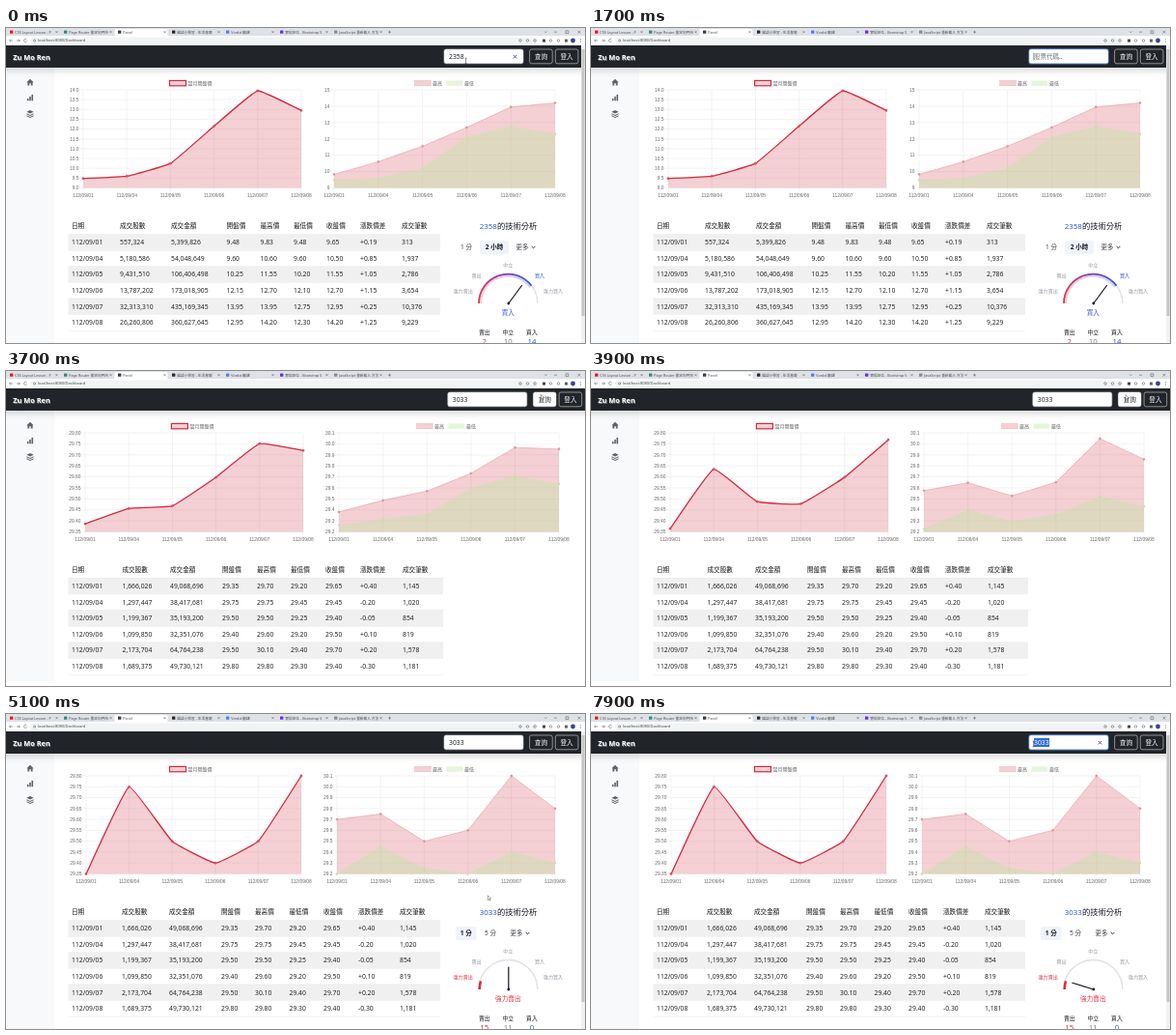
An HTML page that plays this animation: 600x326 px, repeating every 8000 ms.

```html
<!DOCTYPE html>
<html lang="zh-Hant">
<head>
<meta charset="utf-8">
<title>Stock dashboard</title>
<style>
html, body { margin: 0; width: 100%; height: 100%; overflow: hidden; background: #fff; }
svg { display: block; width: 600px; height: 326px; }
text { font-family: 'Noto Sans', 'Noto Sans CJK TC', 'Noto Sans CJK', sans-serif; white-space: pre; }
.axis text { font-family: 'Liberation Sans', 'Noto Sans CJK TC', 'Noto Sans CJK', sans-serif; fill: #666; }
</style>
</head>
<body>
<svg viewBox="0 0 600 326">
  <defs>
    <linearGradient id="mood" gradientUnits="userSpaceOnUse" x1="489" y1="0" x2="546" y2="0">
      <stop offset="0" stop-color="#e0364a"/>
      <stop offset=".45" stop-color="#8e3fae"/>
      <stop offset="1" stop-color="#2a5bd8"/>
    </linearGradient>
    <linearGradient id="shade" x1="0" y1="0" x2="0" y2="1">
      <stop offset="0" stop-opacity=".126"/>
      <stop offset=".33" stop-opacity=".075"/>
      <stop offset=".66" stop-opacity=".024"/>
      <stop offset="1" stop-opacity="0"/>
    </linearGradient>
  </defs>
  <g id="page"></g>
  <g id="charts" class="axis"></g>
  <g id="table"></g>
  <g id="widget"></g>
  <g id="nav"></g>
  <g id="browser"></g>
  <g id="pointer"></g>
</svg>
<script>
const LOOP = 8000, STEP = 100;
const RELOAD = 3700, SETTLE = 4100, CHART_START = 3660;

const lerp = (a, b, p) => a + (b - a) * p;
const clamp = v => Math.max(0, Math.min(1, v));
const at = (steps, t) => steps.filter(s => s[0] <= t).pop();
const polar = (cx, cy, r, deg) => {
  const a = deg * Math.PI / 180;
  return [cx + r * Math.cos(a), cy - r * Math.sin(a)];
};

// y is the vertical middle of the text
const text = (x, y, s, size, attrs = '') =>
  `<text x="${x}" y="${(y + size * 0.36).toFixed(2)}" font-size="${size}" ${attrs}>${s}</text>`;
const rect = (x, y, w, h, fill, attrs = '') =>
  `<rect x="${x}" y="${y}" width="${w}" height="${h}" fill="${fill}" ${attrs}/>`;
const path = (d, attrs) => `<path d="${d}" fill="none" ${attrs}/>`;
const dot = (x, y, r, fill, attrs = '') => `<circle cx="${x}" cy="${y}" r="${r}" fill="${fill}" ${attrs}/>`;
const MID = 'text-anchor="middle" ', END = 'text-anchor="end" ';

const shown = {};
function put(id, markup) {
  if (shown[id] === markup) return;
  shown[id] = markup;
  document.getElementById(id).innerHTML = markup;
}

// ---- data ----
const DAYS = ['01', '04', '05', '06', '07', '08'].map(d => '112/09/' + d);
const HEADS = ['日期', '成交股數', '成交金額', '開盤價', '最高價', '最低價', '收盤價', '漲跌價差', '成交筆數'];
const parse = s => s.split('\n').map((row, i) => [DAYS[i], ...row.split(' ')]);
const OLD = parse(`557,324 5,399,826 9.48 9.83 9.48 9.65 +0.19 313
5,180,586 54,048,649 9.60 10.60 9.60 10.50 +0.85 1,937
9,431,510 106,406,498 10.25 11.55 10.20 11.55 +1.05 2,786
13,787,202 173,018,905 12.15 12.70 12.10 12.70 +1.15 3,654
32,313,310 435,169,345 13.95 13.95 12.75 12.95 +0.25 10,376
26,260,806 360,627,645 12.95 14.20 12.30 14.20 +1.25 9,229`);
const NEW = parse(`1,666,026 49,068,696 29.35 29.70 29.20 29.65 +0.40 1,145
1,297,447 38,417,681 29.75 29.75 29.45 29.45 -0.20 1,020
1,199,367 35,193,200 29.50 29.50 29.25 29.40 -0.05 854
1,099,850 32,351,076 29.40 29.60 29.20 29.50 +0.10 819
2,173,704 64,764,238 29.50 30.10 29.40 29.70 +0.20 1,578
1,689,375 49,730,121 29.80 29.80 29.30 29.40 -0.30 1,181`);
const SCALES = {
  open: [{ min: 9, max: 14, step: .5, digits: 1 }, { min: 29.35, max: 29.8, step: .05, digits: 2 }],
  range: [{ min: 9, max: 15, step: 1, digits: 0 }, { min: 29.2, max: 30.1, step: .1, digits: 1 }]
};

// ---- layouts: first stock, reload without scrollbar, second stock ----
const LAYOUTS = [
  { rows: OLD, cols: [68, 118, 171, 228.5, 263.5, 298, 332, 367, 410], left: [80, 306], right: [340, 569], bottom: 165.5, edge: 450, head: 205, dx: 0 },
  { rows: NEW, cols: [68, 120.5, 170, 224, 260, 295, 331, 367, 411], left: [82, 308], right: [345, 573], bottom: 166.5, edge: 453, head: 205.5, dx: 3.8 },
  { rows: NEW, cols: [68, 120, 169, 223, 258, 293.5, 329, 365, 408], left: [83, 306], right: [343, 569], bottom: 165.5, edge: 450, head: 205, dx: 0 }
];
const layoutAt = t => LAYOUTS[t < RELOAD ? 0 : t < SETTLE ? 1 : 2];

// ---- charts ----
const TOP = 64;
const yOf = (v, s, bottom) => bottom - (v - s.min) / (s.max - s.min) * (bottom - TOP);

function grid([x0, x1], s, bottom) {
  let lines = '', out = '';
  const n = Math.round((s.max - s.min) / s.step);
  for (let i = 0; i <= n; i++) {
    const v = s.min + i * s.step, y = yOf(v, s, bottom);
    lines += `M${x0 - 3} ${y}H${x1}`;
    out += text(x0 - 4.5, y, v.toFixed(s.digits), 4.9, END);
  }
  DAYS.forEach((d, i) => {
    const x = lerp(x0, x1, i / 5);
    lines += `M${x} ${TOP}V${bottom + 3}`;
    out += text(x, bottom + 7.5, d, 4.9, MID);
  });
  return path(lines, 'stroke="#e6e6e6" stroke-width=".5"') + out;
}

function points(col, [x0, x1], scales, bottom, p) {
  return OLD.map((row, i) => [
    lerp(x0, x1, i / 5),
    lerp(yOf(+row[col], scales[0], bottom), yOf(+NEW[i][col], scales[1], bottom), p)
  ]);
}

function curve(pts, tension, bottom) {
  const cap = y => Math.max(TOP, Math.min(bottom, y));
  const handles = pts.map((c, i) => {
    const a = pts[i - 1] || c, b = pts[i + 1] || c;
    const da = Math.hypot(c[0] - a[0], c[1] - a[1]), db = Math.hypot(b[0] - c[0], b[1] - c[1]);
    const shift = k => [c[0] + k * (b[0] - a[0]), cap(c[1] + k * (b[1] - a[1]))];
    return [shift(-tension * da / (da + db)), shift(tension * db / (da + db))];
  });
  return pts.map((c, i) => i ? `C${handles[i - 1][1]} ${handles[i][0]} ${c}` : 'M' + c).join('');
}

function series(pts, bottom, { tension = 0, fill, line, width, mark }) {
  const d = curve(pts, tension, bottom);
  return `<path d="${d}L${pts[5][0]} ${bottom}L${pts[0][0]} ${bottom}Z" fill="${fill}"/>` +
    path(d, `stroke="${line}" stroke-width="${width}" stroke-linejoin="round"`) +
    pts.map(([x, y]) => dot(x, y, 1.15, mark, `stroke="${line}" stroke-width=".4"`)).join('');
}

const PINK = 'rgba(210,60,75,.24)', GREEN = 'rgba(187,229,158,.38)';
function charts(t) {
  const L = layoutAt(t), b = L.bottom, k = t < RELOAD ? 0 : 1, dx = L.dx / 2;
  const p = 1 - (1 - clamp((t - CHART_START) / 1000)) ** 4;
  const pts = (col, span, kind) => points(col, span, SCALES[kind], b, k ? p : 0);
  return grid(L.left, SCALES.open[k], b) + grid(L.right, SCALES.range[k], b) +
    series(pts(3, L.left, 'open'), b, { tension: .1, fill: PINK, line: '#d4283d', width: 1.3, mark: '#cf6674' }) +
    series(pts(4, L.right, 'range'), b, { fill: PINK, line: '#e6a3aa', width: .7, mark: '#dc8f98' }) +
    series(pts(5, L.right, 'range'), b, { fill: GREEN, line: 'rgba(205,225,170,.6)', width: .6, mark: '#d3d9ae' }) +
    rect(169.5 + dx, 54.4, 17, 5.4, PINK, 'stroke="#d4283d" stroke-width="1.2"') +
    text(188.5 + dx, 57, '當月開盤價', 5) +
    rect(423.7 + dx, 54.4, 16.5, 5.4, PINK, 'stroke="#e6b3b8" stroke-width=".5"') +
    text(442 + dx, 57, '最高', 5) +
    rect(456.5 + dx, 54.4, 16.5, 5.4, GREEN) + text(475 + dx, 57, '最低', 5);
}

// ---- table ----
function table(t) {
  const L = layoutAt(t), w = L.edge - 64.5, rowH = L.dx ? 16.65 : 16.55;
  const top = L.head + 8.6;
  let out = HEADS.map((h, i) => text(L.cols[i], L.head, h, 6.6, 'font-weight="500" fill="#111418"')).join('');
  L.rows.forEach((row, r) => {
    const y = top + r * rowH;
    out += rect(64.5, y, w, rowH, r % 2 ? '#fff' : '#f0f0f0') + rect(64.5, y, w, .4, '#dee2e6');
    row.forEach((cell, i) => out += text(L.cols[i], y + rowH / 2, cell, 6.8, 'fill="#212529"'));
  });
  return out + rect(64.5, top + 6 * rowH, w, .4, '#dee2e6');
}

// ---- analysis widget ----
const RED = '#dc3040', BLUE = '#2a5bd8', GREY = '#9598a1', INK = '#131722';
const VIEWS = [
  { code: '2358', tabs: [[477, '1 分'], [506, '2 小時'], [535, '更多']], on: 1, pill: [491, 30], mood: 3, color: BLUE, counts: [2, 10, 14] },
  { code: '3033', tabs: [[476.7, '1 分'], [502, '5 分'], [529, '更多']], on: 0, pill: [466, 21.5], mood: 0, color: RED, counts: [15, 11, 0] }
];
const MOODS = [['強力賣出', 473.7, 272], ['賣出', 487.5, 256], ['中立', 520.3, 245.5], ['買入', 553, 256], ['強力買入', 567, 272]];

function arc(r, from, to, attrs) {
  return path(`M${polar(520.3, 285, r, from)}A${r} ${r} 0 0 1 ${polar(520.3, 285, r, to)}`, attrs);
}

function widget(t) {
  if (t >= RELOAD && t < 5000) return '';
  const v = VIEWS[t < RELOAD ? 0 : 1], first = v === VIEWS[0];
  const ease = 1 - (1 - clamp((t - 5200) / 700)) ** 3;
  const angle = first ? 53.5 : lerp(90, 163, ease);
  const [nx, ny] = polar(520.8, 285, 23, angle);
  let out = text(520.6, 205, `<tspan fill="${BLUE}" font-size="7.9">${v.code}</tspan>的技術分析`, 8.3, MID + `font-weight="500" fill="${INK}"`);
  out += rect(v.pill[0], 220, v.pill[1], 14, '#f0f3fa', 'rx="2"');
  v.tabs.forEach(([x, s], i) => out += text(x, 227, s, 6.5, MID + (i === v.on ? `font-weight="600" fill="${INK}"` : 'fill="#3c3f48"')));
  const cx = v.tabs[2][0] + 11.5;
  out += path(`M${cx - 1.8} 226l1.8 1.8 1.8-1.8`, `stroke="${INK}" stroke-width=".9"`);
  MOODS.forEach(([s, x, y], i) => out += text(x, y, s, 5.1, MID + (i === v.mood ? `font-weight="500" fill="${v.color}"` : `fill="${GREY}"`)));
  out += arc(30.5, 180, 0, 'stroke="#dfe1e6" stroke-width="1.4"');
  out += first
    ? arc(29, 180, 37, 'stroke="url(#mood)" stroke-width="3.6" opacity=".25"') + arc(30.3, 180, 37, 'stroke="url(#mood)" stroke-width="1.7"')
    : arc(29.6, 180, 163, `stroke="${RED}" stroke-width="2.6"`);
  out += path(`M520.8 285L${nx} ${ny}`, `stroke="${INK}" stroke-width="1.2" stroke-linecap="round"`) + dot(520.8, 285, 1.4, INK);
  out += text(520.3, 295, MOODS[v.mood][0], 6.6, MID + `font-weight="500" fill="${v.color}"`);
  ['賣出', '中立', '買入'].forEach((s, i) => {
    const x = 495.7 + 24.6 * i;
    out += text(x, 314.7, s, 5.8, MID + `font-weight="500" fill="${INK}"`);
    out += text(x, 324.2, v.counts[i], 7.8, MID + `fill="${[RED, '#787b86', BLUE][i]}"`);
  });
  return out;
}

// ---- navigation bar ----
const TYPED = [[0, '2358'], [1300, ''], [1900, '3'], [2100, '30'], [2300, '303'], [2500, '3033']];
function nav(t) {
  const dx = layoutAt(t).dx, x = 454 + dx, width = dx ? 600 : 596;
  const value = at(TYPED, t)[1];
  const focus = t >= 400 && t < 3500 || t >= 6900;
  const selected = t >= 700 && t < 1300 ? 1 : clamp((t - 6900) / 400);
  const hover = t < 4000 ? clamp((t - 3100) / 200) : 0;
  const ink = [33, 37, 41].map(c => Math.round(lerp(255, c, hover)));
  let out = rect(0, 18, width, 23, '#212529') + rect(0, 41, width, 10, 'url(#shade)');
  out += text(8, 31, 'Zu Mo Ren', 7.4, 'font-weight="700" fill="#7d8083"') + text(7.2, 30.2, 'Zu Mo Ren', 7.4, 'font-weight="700" fill="#fff"');
  if (focus) out += rect(x - .9, 21.1, 83.8, 16.6, '#2a4a7d', 'rx="3"');
  out += rect(x, 22, 82, 14.8, '#fff', `rx="2" stroke="${focus ? '#86b7fe' : '#ced4da'}" stroke-width=".6"`);
  if (selected) out += rect(x + 5 + 16 * (1 - selected), 24.9, 16 * selected, 9.2, '#2f6fd6');
  out += value
    ? text(x + 5, 29.5, value, 6.8, `fill="${selected === 1 ? '#fff' : '#212529'}"`)
    : text(x + 5, 29.5, '股票代碼..', 6.5, 'fill="#6c757d"');
  if (focus && !selected && t < 2700) out += rect(x + 4.7 + value.length * 3.9, 25.5, .4, 8, '#212529');
  if (value && (t < 3500 || t >= 6800))
    out += path(`M${x + 71.8} 28l3.4 3.4m0-3.4l-3.4 3.4`, 'stroke="#3f51a8" stroke-width="1"');
  const button = (bx, s, fill, color) =>
    rect(bx, 22, 23.6, 14.8, '#fff', `fill-opacity="${fill}" rx="2" stroke="#f8f9fa" stroke-width=".5"`) +
    text(bx + 11.8, 29.4, s, 6.6, MID + `fill="${color}"`);
  return out + button(542.6 + dx, '查詢', hover, `rgb(${ink})`) + button(569.3 + dx, '登入', 0, '#fff');
}

// ---- page frame ----
function page(t) {
  const wide = layoutAt(t).dx > 0, icon = '#5c636a';
  let out = rect(0, 0, 600, 326, '#fff') + rect(0, 41, 50, wide ? 280 : 285, '#f8f9fb');
  out += `<path d="M21.4 56.2L25 52.8l3.6 3.4h-1v3.2h-1.8v-2.2h-1.6v2.2h-1.8v-3.2z" fill="${icon}"/>`;
  out += [[21.9, 2.4], [24.2, 4.4], [26.5, 6.4]].map(([x, h]) => rect(x, 75.3 - h, 1.6, h, icon)).join('');
  out += `<path d="M25 85l3.6 1.7L25 88.4l-3.6-1.7zM21.4 88.3L25 90l3.6-1.7v.9L25 90.9l-3.6-1.7zM21.4 90.3L25 92l3.6-1.7v.9L25 92.9l-3.6-1.7z" fill="${icon}"/>`;
  if (!wide) out += rect(596, 18, 4, 308, '#f1f1f1') + rect(596.5, 22, 3, 276, '#c6c6c6');
  return out;
}

function browser() {
  const tabs = [
    ['#e02020', 'CSS Layout Lesson - P'], ['#2f8f83', 'Page Router 重定向門市'], ['#3b3f45', 'Panel'],
    ['#2b2b2b', '國語小學習 - 生活基礎'], ['#4285f4', 'Vordal 翻譯'],
    ['#6f2cf5', '實現定位 - Bootstrap 5'], ['#8a8d91', 'JavaScript 重新載入 方法']
  ];
  const stroke = 'stroke="#5f6368" stroke-width=".6"';
  let out = rect(0, 0, 600, 8.5, '#dee1e6') + rect(0, 8.3, 600, 9.7, '#fff') + rect(112.5, 1, 55, 8, '#fff', 'rx="1.5"');
  tabs.forEach(([color, s], i) => {
    const x = 4 + 56 * i;
    out += rect(x, 2.4, 3.4, 3.4, color, 'rx=".6"') + text(x + 5.3, 4.2, s, 3.7, 'fill="#4a4d51"');
    out += path(`M${x + 47.5} 3.2l2 2m0-2l-2 2`, stroke);
  });
  out += path('M396 4.2h3m-1.5-1.5v3M558 3.5l1.3 1.3 1.3-1.3M568 4.2h3M580 2.8h2.8v2.8H580zM592.5 2.8l2.8 2.8m0-2.8l-2.8 2.8', stroke);
  out += rect(25, 9.6, 526, 7, '#f1f3f4', 'rx="3.5"');
  out += path('M7 13H3.6l1.4-1.4m-1.4 1.4l1.4 1.4M11 13h3.4l-1.4-1.4m1.4 1.4l-1.4 1.4M21.5 12a1.6 1.6 0 1 0 .1 1.6', stroke);
  out += dot(29.6, 13, 1.1, 'none', stroke) + text(33, 13, 'localhost:8080/Dashboard', 4, 'fill="#4a4d51"');
  [533, 540.5, 548, 564.5, 572.5].forEach(x => out += dot(x, 13, 1.3, 'none', stroke));
  out += rect(556, 11.6, 3, 3, '#44474b') + rect(579, 11.6, 3, 3, '#5f6368') + dot(587.5, 13, 2.4, '#3c3f9f');
  return out + [11.5, 13, 14.5].map(y => dot(595.5, y, .45, '#5f6368')).join('');
}

// ---- pointer ----
const ROUTE = [
  [0, 476.5, 34], [500, 474, 31], [1200, 474, 31], [2800, 505, 34], [3100, 553, 25], [3200, 555.5, 23.5],
  [3900, 554, 24.5], [4000, 548, 60], [4300, 499.3, 187.8], [5200, 499.3, 187.8], [6000, 479.7, 57.3],
  [6500, 479.7, 57.3], [6900, 475.5, 31], [7300, 458.5, 31], [8000, 458.5, 31]
];
function pointer(t) {
  if (t >= 1200 && t < 2800) return '';
  const i = Math.max(1, ROUTE.findIndex(r => r[0] > t));
  const a = ROUTE[i - 1], b = ROUTE[i], p = (t - a[0]) / (b[0] - a[0]);
  const q = p * p * (3 - 2 * p), x = lerp(a[1], b[1], q), y = lerp(a[2], b[2], q);
  if (x > 454 && x < 536 && y > 22 && y < 37.5)
    return path(`M${x - 1} ${y - 2.8}h2m-1 0v5.6m-1 0h2`, 'stroke="#222" stroke-width=".5"');
  return `<path transform="translate(${x} ${y})" d="M0 0V4.7L1.1 3.7 1.9 5.4 2.7 5 1.9 3.4H3.4Z" fill="#fff" stroke="#222" stroke-width=".4"/>`;
}

put('browser', browser());
const parts = { page, charts, table, widget, nav, pointer };
const start = performance.now();
function frame() {
  const t = Math.floor((performance.now() - start) % LOOP / STEP) * STEP;
  for (const id in parts) put(id, parts[id](t));
  requestAnimationFrame(frame);
}
frame();
</script>
</body>
</html>
```
